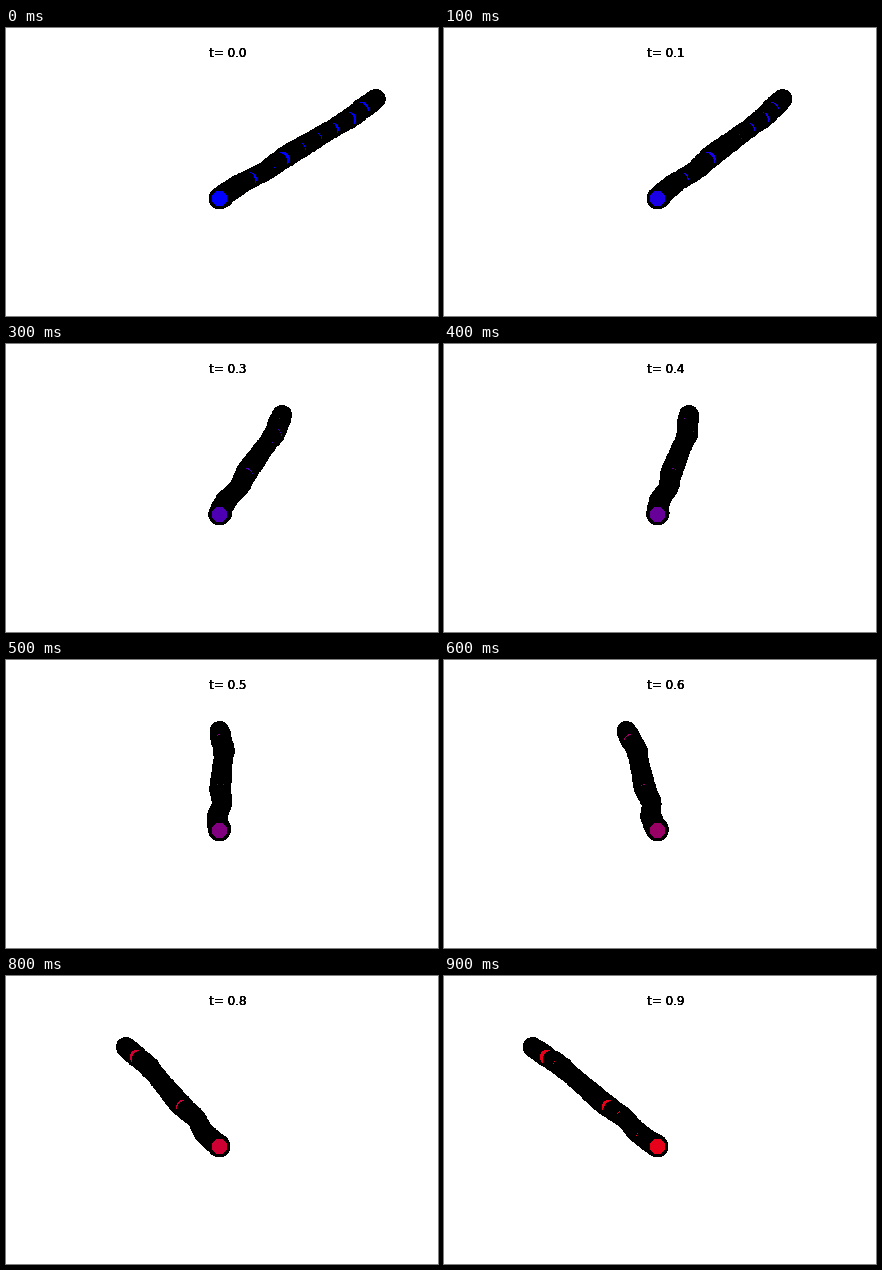
Write a matplotlib script that moves like this. It is 432x288 px and loops after 1 s.

```python
import numpy as np
import matplotlib.pyplot as plt
from matplotlib.animation import FuncAnimation

plt.rcParams["font.family"] = "DejaVu Sans"
W, H, DPI = 432, 288, 72
FRAMES, INTERVAL = 10, 100
BASE_X, BASE_Y, REACH, HEIGHT = 213.5, 170.5, 157, 100


def bead_heights():
    """Packed beads from tip to base, with a gap in every tenth pixel row."""
    rows = []
    for k in range(10):
        top = 71 + 10 * k
        gap = 3.6 if k % 5 == 1 else 2.1
        rows += [top, *np.arange(top + gap, top + 9.5, 1.0)]
    return np.append(rows, BASE_Y)


rng = np.random.default_rng(4)
bead_y = bead_heights()
along = (BASE_Y - bead_y) / HEIGHT
sway = np.interp(along, [0, .14, .28, .42, .8, 1], [0, -2.5, 3, .5, 4.5, 0])
sway[1:-1] += rng.normal(0, 0.4, len(along) - 2)
radius = 8.8 - 0.6 * along + 0.6 * np.cos(2 * np.pi * along / 0.45)

fig = plt.figure(figsize=(W / DPI, H / DPI), dpi=DPI, facecolor="white")
ax = fig.add_axes([0, 0, 1, 1])
ax.set(xlim=(0, W), ylim=(H, 0))
ax.axis("off")

beads = ax.scatter(bead_y, bead_y, s=(2 * radius) ** 2, edgecolors="black",
                   linewidths=2, antialiaseds=False)
# Stacked copies give the title its heavy, hard-edged look.
titles = [ax.text(221.4, 29.4, "", fontsize=12, ha="center") for _ in range(5)]


def update(frame):
    t = frame / FRAMES
    x = BASE_X + REACH * along * (1 - 2 * t) + sway
    beads.set_offsets(np.column_stack([x, bead_y]))
    beads.set_facecolor((t, 0, 1 - t))
    for title in titles:
        title.set_text(f"t= {t:.1f}")
    return beads, *titles


anim = FuncAnimation(fig, update, frames=FRAMES, interval=INTERVAL,
                     repeat=True, repeat_delay=0)
plt.show()
```
